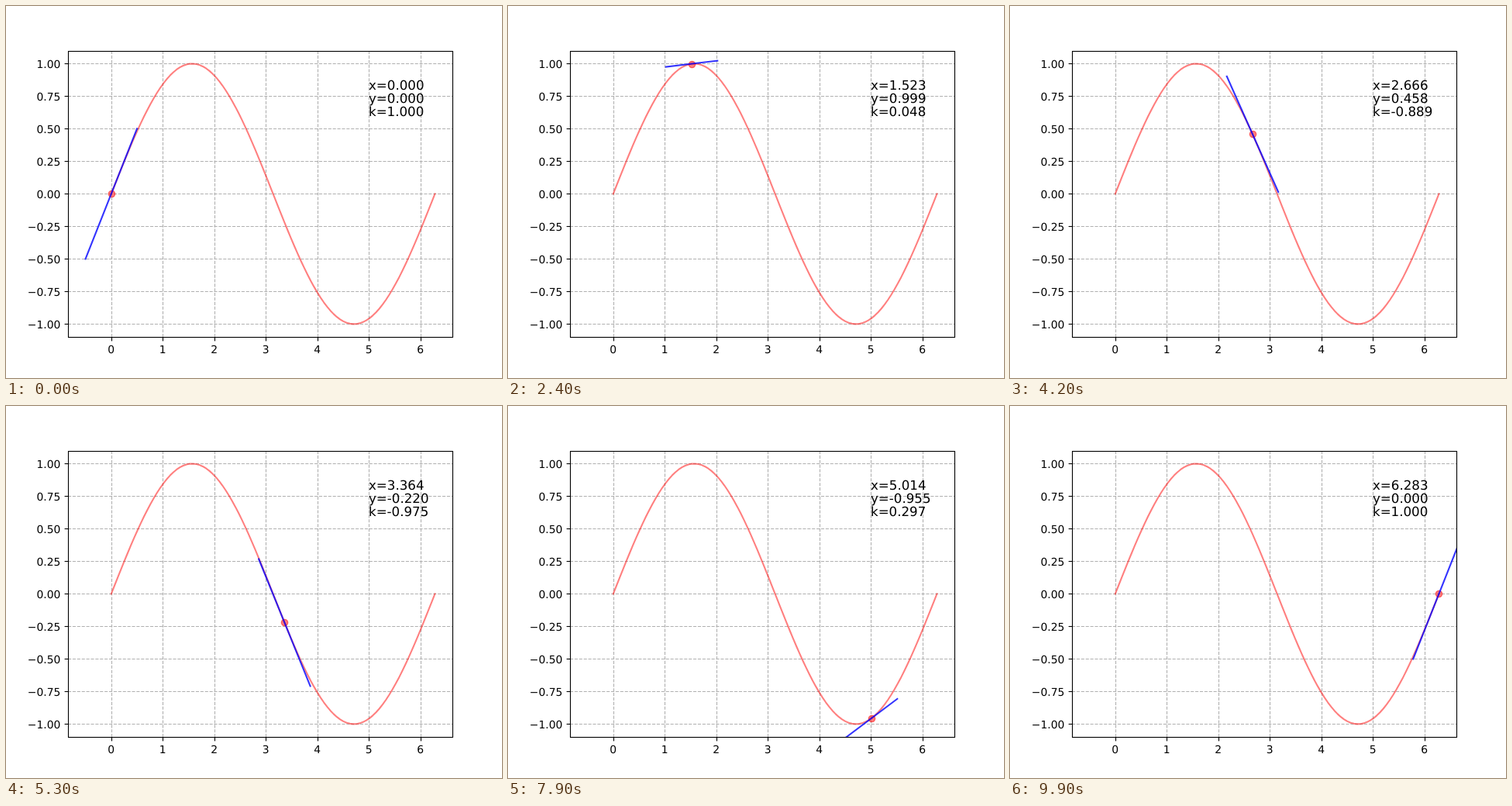
Recreate the animation shown at these times as an HTML page. Size 640x480 px, loop 10000 ms.

```html
<!DOCTYPE html>
<html lang="en">
<head>
<meta charset="utf-8">
<title>Tangent of a sine curve</title>
<style>
  html, body { margin: 0; width: 100%; height: 100%; overflow: hidden; background: #fff; }
  svg { display: block; }
  text { font-family: "DejaVu Sans", sans-serif; text-rendering: geometricPrecision; white-space: pre; }
  .tick { font-size: 13.89px; }
  .info { font-size: 16.67px; }
  .grid { stroke: #b0b0b0; stroke-width: 1.11; stroke-dasharray: 4.11 1.78; }
  .axis { stroke: #000; stroke-width: 1.11; fill: none; }
  .curve { fill: none; stroke: #f00; stroke-opacity: .5; stroke-width: 2.083; stroke-linecap: square; stroke-linejoin: round; }
  .dot { fill: #f00; fill-opacity: .5; stroke: #f00; stroke-opacity: .5; stroke-width: 1.39; }
  .tangent { stroke: #00f; stroke-opacity: .8; stroke-width: 2.083; stroke-linecap: square; }
</style>
</head>
<body>
<svg id="stage" width="640" height="480" viewBox="0 0 640 480">
  <defs><clipPath id="plot"><rect x="80" y="58" width="496" height="369"/></clipPath></defs>
</svg>
<script>
const FRAMES = 100, STEP = 100, TURN = 2 * Math.PI;
const LEFT = 80, RIGHT = 576, TOP = 57.6, BOTTOM = 427.2;

// data range with a 5% margin on each side
const span = TURN + 0.5;
const xMin = -0.5 - span * 0.05;
const px = x => LEFT + (x - xMin) * (RIGHT - LEFT) / (span * 1.1);
const py = y => (TOP + BOTTOM) / 2 - y * (BOTTOM - TOP) / 2.2;
const snap = v => Math.floor(v + 0.5) + 0.5;

const stage = document.getElementById('stage');
function add(tag, attrs, parent = stage) {
  const el = document.createElementNS('http://www.w3.org/2000/svg', tag);
  set(el, attrs);
  return parent.appendChild(el);
}
function set(el, attrs) {
  for (const key in attrs) el.setAttribute(key, attrs[key]);
}
const line = (cls, x1, y1, x2, y2, parent) => add('line', { class: cls, x1, y1, x2, y2 }, parent);
const label = (str, x, y, anchor) => {
  add('text', { class: 'tick', x, y, 'text-anchor': anchor }).textContent = str;
};

const grid = add('g', { 'clip-path': 'url(#plot)' });
const plot = add('g', { 'clip-path': 'url(#plot)' });

for (let n = 0; n <= 6; n++) {
  const x = snap(px(n));
  line('grid', x, BOTTOM, x, TOP, grid);
  line('axis', x, 427.5, x, 432.4);
  label(String(n), px(n), 448, 'middle');
}
for (let n = -4; n <= 4; n++) {
  const y = snap(py(n / 4));
  line('grid', LEFT, y, RIGHT, y, grid);
  line('axis', 80.5, y, 75.6, y);
  label((n / 4).toFixed(2).replace('-', '\u2212'), 70.3, Math.round(py(n / 4) + 5.3), 'end');
}

const xAt = i => TURN * i / (FRAMES - 1);
const points = Array.from({ length: FRAMES }, (_, i) => `${px(xAt(i))},${py(Math.sin(xAt(i)))}`);
add('polyline', { class: 'curve', points: points.join(' ') }, plot);
const dot = add('circle', { class: 'dot', r: 4.17 }, plot);
const tangent = line('tangent', 0, 0, 0, 0, plot);

add('rect', { class: 'axis', x: 80.5, y: 58.5, width: 496, height: 369 });
const info = [0.8, 0.7, 0.6].map(y =>
  add('text', { class: 'info', x: Math.round(px(5)), y: Math.round(py(y)) }));

function draw(i) {
  const x = xAt(i), y = Math.sin(x), k = Math.cos(x);
  set(dot, { cx: snap(px(x)), cy: snap(py(y)) });
  set(tangent, {
    x1: px(x - 0.5), y1: py(y - k / 2),
    x2: px(x + 0.5), y2: py(y + k / 2)
  });
  [['x', x], ['y', y], ['k', k]].forEach(([name, value], row) => {
    info[row].textContent = `${name}=${value.toFixed(3)}`;
  });
}

function tick() {
  draw(Math.floor(performance.now() / STEP) % FRAMES);
  requestAnimationFrame(tick);
}
tick();
</script>
</body>
</html>
```
